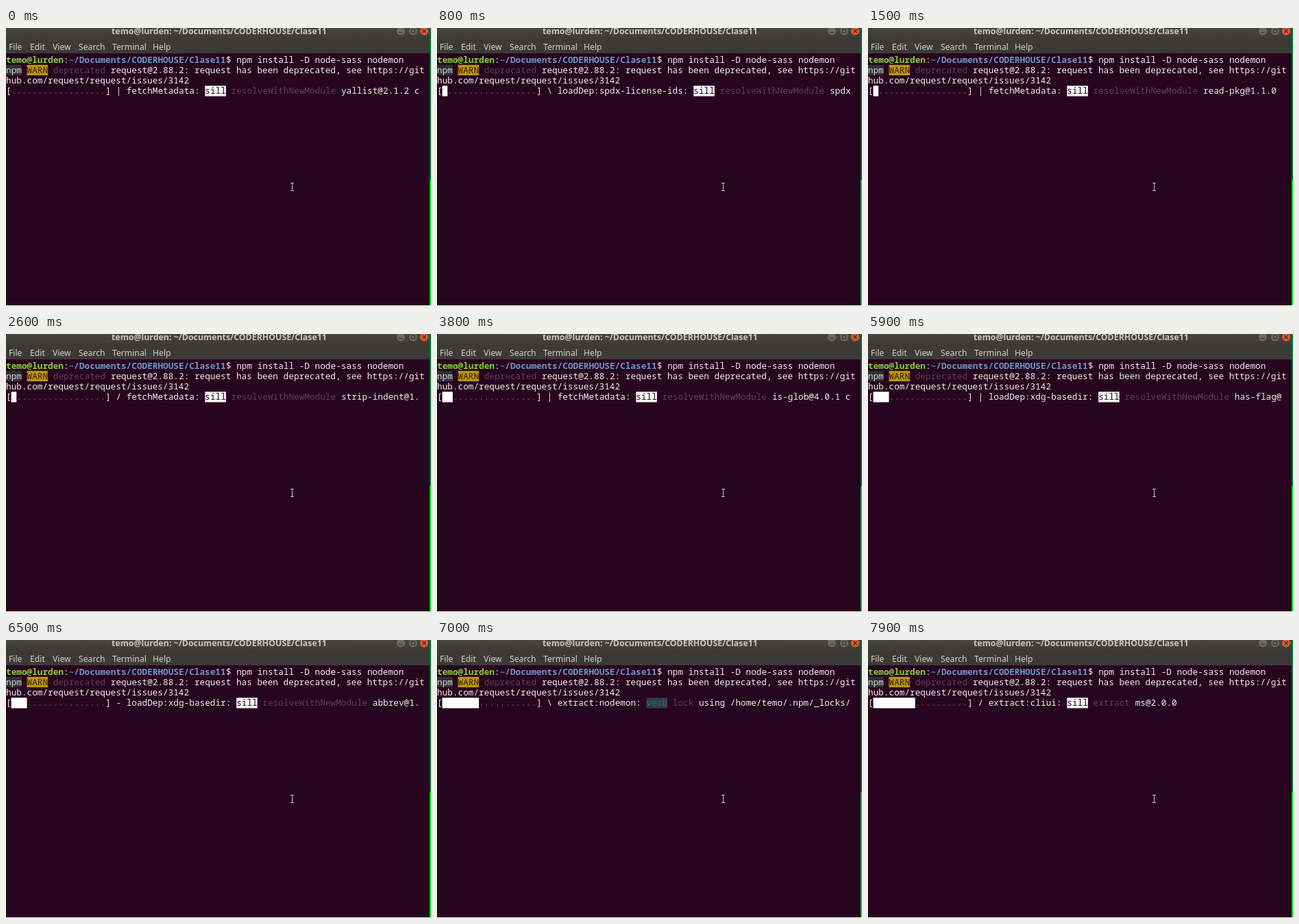
An HTML page with a canvas for the animation above (8 s loop, 620 by 406 pixels).

```html
<!DOCTYPE html>
<html lang="en">
<head>
<meta charset="utf-8">
<title>Terminal</title>
<style>
  html, body { margin: 0; width: 100%; height: 100%; overflow: hidden; background: #28051f; }
  canvas { display: block; }
</style>
</head>
<body>
<canvas id="stage" width="620" height="406"></canvas>
<script>
const ctx = document.getElementById('stage').getContext('2d');
const LOOP = 8000, TICK = 100, COL = 7.64, ROW = 15.25, TOP = 38.6, LAST_COL = 79, BAR = 18;
const WHITE = '#eeeeec', DIM = '#5c3f56', BG = '#28051f';
const MONO = '12.733px "Noto Sans Mono", monospace';
const SANS = '"Noto Sans", sans-serif';
const USER = 'temo', HOST = 'lurden', DIR = '~/Documents/CODERHOUSE/Clase11';

// Ticks on which the picture stands still
const HELD = [22, 23, 27, 28, 55, 56];

// First tick, filled cells, spinner offset, label, level, action, fixed tail
const RESOLVE = ['sill', 'resolveWithNewModule'];
const PHASES = [
  [0, 0, 0, 'fetchMetadata', ...RESOLVE],
  [5, 1, 3, 'loadDep:spdx-license-ids', ...RESOLVE],
  [12, 1, 1, 'fetchMetadata', ...RESOLVE],
  [38, 2, 2, 'fetchMetadata', ...RESOLVE],
  [50, 3, 3, 'fetchMetadata', ...RESOLVE],
  [53, 3, 3, 'loadDep:xdg-basedir', ...RESOLVE],
  [66, 5, 3, 'extract:chokidar', 'sill', 'extract'],
  [69, 7, 3, 'extract:nodemon', 'verb', 'lock using', `/home/${USER}/.npm/_locks/`],
  [72, 7, 3, 'extract:nodemon', 'sill', 'extract'],
  [75, 8, 0, 'extract:cliui', 'sill', 'extract']
];

// One package per visible step
const PACKAGES = `yallist@2.1.2 pseudomap@1.0.2 lru-cache@4.1.5 which@1.3.1 isexe@2.0.0
  normalize-package-data@2.5.0 hosted-git-info@2.8.4 spdx-correct@3.1.0 spdx-exceptions@2.2.0
  spdx-expression-parse@3.0.0 resolve@1.12.0 path-parse@1.0.6 semver@5.7.1 read-pkg-up@1.0.1
  find-up@1.1.2 read-pkg@1.1.0 load-json-file@1.1.0 path-type@1.1.0 pify@2.3.0 strip-bom@2.0.0
  parse-json@2.2.0 error-ex@1.3.2 is-arrayish@0.2.1 redent@1.0.0 strip-indent@1.0.1
  indent-string@2.1.0 repeating@2.0.1 is-finite@1.0.2 trim-newlines@1.0.0 get-stdin@4.0.1
  chokidar@2.1.8 anymatch@2.0.0 braces@2.3.2 glob-parent@3.1.0 is-glob@4.0.1 readdirp@2.2.1
  upath@1.2.0 micromatch@3.1.10 arr-diff@4.0.0 extglob@2.0.4 fill-range@4.0.0 to-regex@3.0.2
  is-number@7.0.0 kind-of@6.0.2 snapdragon@0.8.2 debug@3.2.6 undefsafe@2.0.2 pstree.remy@1.1.7
  touch@3.1.0 nopt@1.0.10 update-notifier@2.5.0 boxen@1.3.0 supports-color@5.5.0 has-flag@3.0.0
  chalk@2.4.2 ansi-styles@3.2.1 configstore@3.1.2 dot-prop@4.2.0 make-dir@1.3.0 abbrev@1.1.1
  glob@7.1.4 rimraf@2.7.1 inherits@2.0.4 once@1.4.0 wrappy@1.0.2 minimatch@3.0.4 nan@2.14.0
  mkdirp@0.5.1 wrap-ansi@2.1.0 string-width@1.0.2 y18n@3.2.1 yargs@7.1.0 aproba@1.2.0
  ms@2.0.0`.split(/\s+/);

const barFill = ctx.createLinearGradient(0, 0, 0, 16);
barFill.addColorStop(0, '#484640');
barFill.addColorStop(1, '#3b3a36');

function rect(x, y, w, h, color) {
  ctx.fillStyle = color;
  ctx.fillRect(x, y, w, h);
}

function label(text, x, y, font, color) {
  ctx.font = font;
  ctx.fillStyle = color;
  ctx.fillText(text, x, y);
}

// Writes [text, colour, background, weight] runs along a terminal row
function row(index, runs) {
  const top = TOP + ROW * index;
  let col = 0;
  for (const [text, color = WHITE, back, weight = ''] of runs) {
    if (back) rect(col * COL, top, text.length * COL, ROW, back);
    label(text, col * COL, top + 12, `${weight} ${MONO}`, color);
    col += text.length;
  }
}

// Strokes one line per pair of points
function stroke(color, width, ...points) {
  ctx.strokeStyle = color;
  ctx.lineWidth = width;
  ctx.beginPath();
  points.forEach(([x, y], i) => i % 2 ? ctx.lineTo(x, y) : ctx.moveTo(x, y));
  ctx.stroke();
}

function button(x, color) {
  ctx.fillStyle = color;
  ctx.beginPath();
  ctx.arc(x, 4.5, 6, 0, 7);
  ctx.fill();
}

function drawWindow() {
  rect(0, 0, 620, 406, BG);
  rect(0, 0, 620, 37, barFill);
  label(`${USER}@${HOST}: ${DIR}`, 154, 9, `bold 12.35px ${SANS}`, '#cbc7bd');
  button(576, '#6c6a63');
  button(594, '#6c6a63');
  button(610, '#e4582f');
  const ink = '#35342f';
  stroke(ink, 1.2, [573, 6.5], [579, 6.5]);
  ctx.strokeRect(591.5, 2, 5, 5);
  stroke(ink, 1.4, [607.5, 2], [612.5, 7], [612.5, 2], [607.5, 7]);

  const menu = { File: 4, Edit: 35, View: 68, Search: 106, Terminal: 155, Help: 214 };
  for (const name in menu) label(name, menu[name], 32, `12.2px ${SANS}`, '#d6d2c9');

  rect(618, 0, 2, 222, '#007a32');
  rect(618, 222, 2, 184, '#02dc1e');
  rect(0, 405, 620, 1, '#f4f4f4');
}

function drawPointer() {
  stroke('#c9c0c6', 1, [417.5, 227], [417.5, 237],
    [415, 226.5], [420, 226.5], [415, 237.5], [420, 237.5]);
}

function drawStatus(tick) {
  const step = tick - HELD.filter(t => t <= tick).length;
  const [, filled, offset, name, level, action, fixed] = PHASES.filter(p => p[0] <= tick).pop();
  const note = action === 'extract' ? '' : ' checking installable status';
  const tail = fixed || PACKAGES[step] + note;
  const [verb, ...rest] = action.split(' ');
  const levelColors = level === 'sill' ? ['#1c1018', '#f8f5f8'] : ['#33668f', '#303b48'];
  const runs = [
    ['['],
    [' '.repeat(filled), WHITE, '#fff'],
    ['.'.repeat(BAR - filled), '#715a69'],
    [`] ${'|/-\\'[(step + offset) % 4]} ${name}: `],
    [level, ...levelColors],
    [' ' + verb, DIM],
    [' ' + [...rest, tail].join(' ')]
  ];
  // The status line stops one column short of the row
  let room = LAST_COL;
  for (const run of runs) {
    run[0] = run[0].slice(0, room);
    room -= run[0].length;
  }
  row(3, runs);
}

function draw(now) {
  drawWindow();
  row(0, [
    [`${USER}@${HOST}`, '#82d531', null, 'bold'],
    [':'],
    [DIR, '#6b97c8', null, 'bold'],
    ['$ npm install -D node-sass nodemon']
  ]);
  row(1, [
    ['npm', '#d8d6d6', '#2e3034'],
    [' '],
    ['WARN', '#2c2108', '#bd950c'],
    [' deprecated', DIM],
    [' request@2.88.2: request has been deprecated, see https://git']
  ]);
  row(2, [['hub.com/request/request/issues/3142']]);
  drawStatus(Math.floor(now % LOOP / TICK));
  drawPointer();
}

function frame() {
  draw(performance.now());
  requestAnimationFrame(frame);
}
frame();
</script>
</body>
</html>
```
